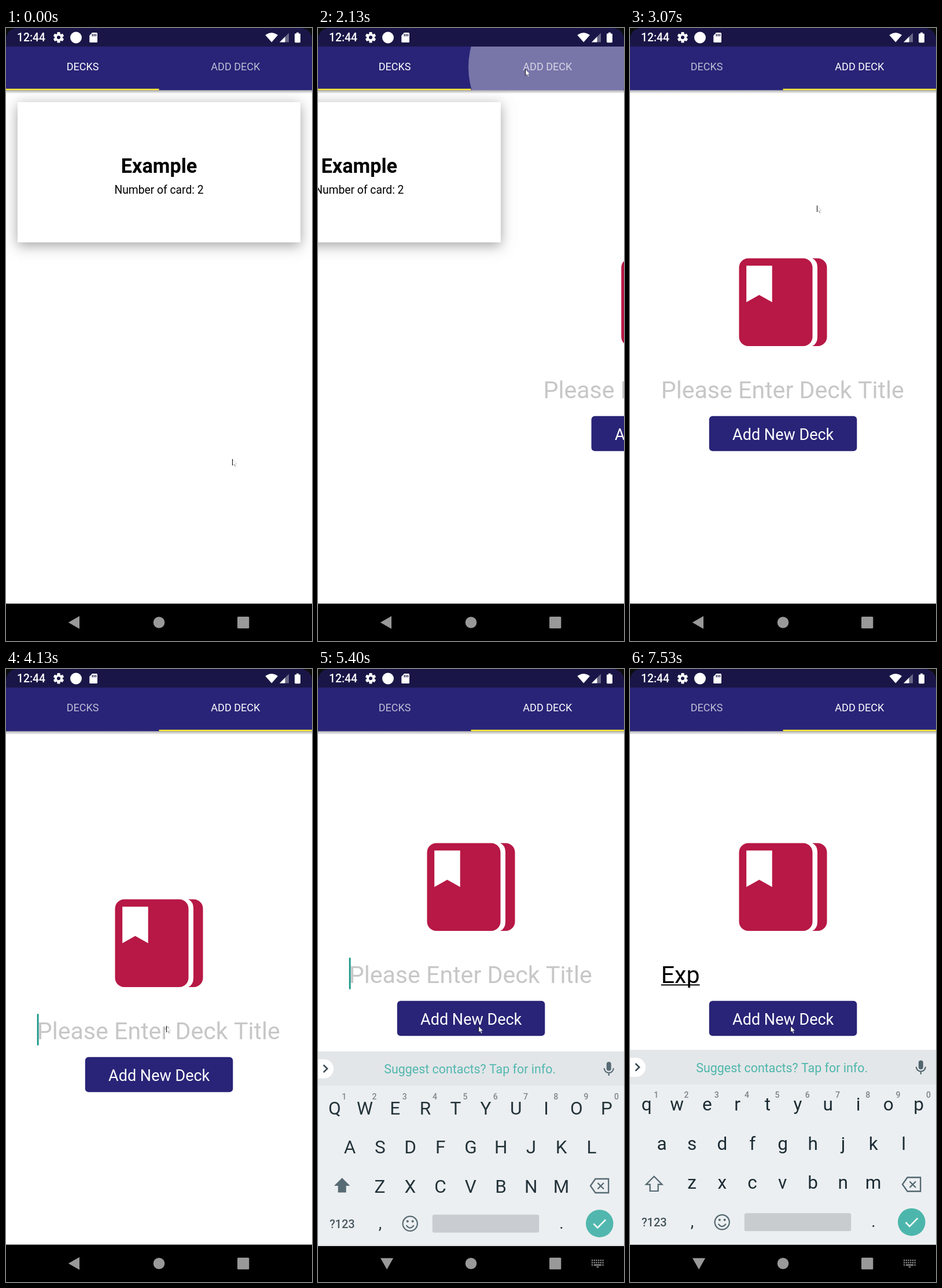
Recreate the animation shown at these times as an HTML page with a canvas. Size 529 px wide and 1058 px high, loop 8 s.

```html
<!DOCTYPE html>
<html lang="en">
<head>
<meta charset="utf-8">
<title>Flashcard decks</title>
<style>
html, body { margin: 0; width: 100%; height: 100%; overflow: hidden; background: #fff; }
canvas { display: block; width: 529px; height: 1058px; }
</style>
</head>
<body>
<canvas id="stage" width="529" height="1058"></canvas>
<script>
const W = 529, H = 1058, LOOP = 8000, FPS = 15;
const NAVY = '#292477', RED = '#b71845', TEAL = '#4db6ac', SLATE = '#52666f', NAV = '#999';
const HEAD = 107.4, KEYS_END = 993.5, FIELD_X = 53.7, SCROLL = 97;
const c = document.getElementById('stage').getContext('2d');

const clamp = v => Math.max(0, Math.min(1, v));
const lerp = (a, b, k) => a + (b - a) * k;
const within = (n, spans) => spans.some(([a, b]) => n >= a && n < b);

function rect(x, y, w, h, fill) {
  c.fillStyle = fill;
  c.fillRect(x, y, w, h);
}
function round(x, y, w, h, r, fill) {
  c.fillStyle = fill;
  c.beginPath();
  c.roundRect(x, y, w, h, r);
  c.fill();
}
function disc(x, y, r, fill) {
  c.fillStyle = fill;
  c.beginPath();
  c.arc(x, y, r, 0, Math.PI * 2);
  c.fill();
}
function shape(d, fill) {
  c.fillStyle = fill;
  c.fill(new Path2D(d));
}
function line(d, color, width) {
  c.strokeStyle = color;
  c.lineWidth = width;
  c.stroke(new Path2D(d));
}
function text(str, x, y, size, color, align = 'center', weight = 400) {
  c.font = `${weight} ${size}px Roboto, sans-serif`;
  c.textAlign = align;
  c.fillStyle = color;
  c.fillText(str, x, y);
}
function at(x, y, draw) {
  c.save();
  c.translate(x, y);
  draw();
  c.restore();
}

// Page slide; the tab indicator follows two ticks later.
function slide(n) {
  const u = clamp((n * 1000 / FPS - 2115) / 211);
  return 1 - Math.pow(1 - u, 5);
}

// tick, x, y
const PATH = [
  [0, 391, 744], [3, 389, 650], [6, 376, 400], [8, 362, 210], [10, 352, 121],
  [13, 336, 233], [16, 367, 130], [19, 358, 71]
];
function pointer(n) {
  if (n >= 41) {
    const k = clamp((n - 41) / 11), e = k * k * (3 - 2 * k);
    return [lerp(358, 277, e), lerp(71, 616, e)];
  }
  const i = PATH.findIndex(p => p[0] > n);
  if (i < 0) return [358, 71];
  const a = PATH[i - 1], b = PATH[i], k = (n - a[0]) / (b[0] - a[0]);
  return [lerp(a[1], b[1], k), lerp(a[2], b[2], k)];
}

function drawPointer(n) {
  const [x, y] = pointer(n);
  at(x, y, () => {
    const arrow = 'M.5 .5V11L3 8.8L5 13L6.6 12.3L4.8 8.3H8Z';
    shape(arrow, '#fff');
    line(arrow, 'rgba(0,0,0,.22)', .8);
    line('M.5 0V11', '#111', 1.1);
    line('M3.6 9.2L5 12.4', 'rgba(0,0,0,.5)', .8);
  });
}

function drawDecks() {
  c.save();
  c.shadowColor = 'rgba(0,0,0,.14)';
  c.shadowBlur = 20;
  rect(20, 128, 489, 242, '#fff');
  c.shadowColor = 'rgba(0,0,0,.24)';
  c.shadowBlur = 20;
  c.shadowOffsetY = 8;
  rect(20, 128, 489, 242, '#fff');
  c.restore();
  text('Example', 264.5, 249.5, 34.2, '#000', 'center', 700);
  text('Number of card: 2', 264.5, 286.3, 19.3, '#000');
}

function drawBook() {
  round(188.5, 397.5, 127, 151.5, 16, RED);
  shape('M315 397.5H324.5A16 16 0 0 1 340.5 413.5V533A16 16 0 0 1 324.5 549H315' +
        'Q324 545 324 533V413.5Q324 401.5 315 397.5Z', RED);
  shape('M201.2 410.2H245.7V473.2L223.4 460.8L201.2 473.2Z', '#fff');
}

function drawForm(n) {
  const typed = 'Exp'.slice(0, n >= 104 ? 3 : n >= 100 ? 2 : n >= 88 ? 1 : 0);
  drawBook();
  text(typed || 'Please Enter Deck Title', FIELD_X, 639, 41.14, typed ? '#000' : '#c7c7c7', 'left');
  const end = typed ? c.measureText(typed).width : 0;
  rect(FIELD_X, 641.3, end, 2, '#000');
  if (within(n, [[62, 68], [75, 83], [88, 96], [100, 113]])) {
    rect(FIELD_X + end, 595.3, 2.8, 54.3, '#159688');
  }
  round(136.8, 669.8, 255.5, 60.4, 6, NAVY);
  text('Add New Deck', 264.7, 711.3, 27, '#fff');
}

function drawRipple(n) {
  if (n < 27 || n > 33) return;
  const age = (n - 27) * 1000 / FPS + 30;
  const e = 1 - Math.pow(1 - clamp(age / 225), 2);
  const alpha = .37 * clamp(age / 75) * (n === 33 ? .4 : 1);
  c.save();
  c.beginPath();
  c.rect(0, 32, W, HEAD - 32);
  c.clip();
  disc(lerp(358, 397, e), lerp(72, 67.5, e), lerp(60, 137, e), `rgba(255,255,255,${alpha})`);
  c.restore();
}

function drawHeader(n) {
  const pos = slide(n - 2);
  const shade = c.createLinearGradient(0, HEAD, 0, HEAD + 6);
  shade.addColorStop(0, 'rgba(0,0,0,.32)');
  shade.addColorStop(1, 'rgba(0,0,0,0)');
  rect(0, HEAD, W, 6, shade);
  rect(0, 32, W, HEAD - 32, NAVY);
  drawRipple(n);
  text('DECKS', 132.5, 73, 18, `rgba(255,255,255,${1 - .3 * pos})`);
  text('ADD DECK', 396.8, 73, 18, `rgba(255,255,255,${.7 + .3 * pos})`);
  rect(264.5 * pos, HEAD - 2.6, 264.5, 2.6, '#ffeb3b');
}

function drawStatus() {
  rect(0, 0, W, 32, '#191647');
  text('12:44', 19, 23.4, 19.3, '#fff', 'left', 500);
  at(91, 16.3, () => {
    for (let i = 0; i < 6; i++) {
      c.rotate(Math.PI / 3);
      round(-2.6, -9.2, 5.2, 6, 1, '#fff');
    }
    disc(0, 0, 6.8, '#fff');
    disc(0, 0, 3, '#191647');
  });
  disc(121, 16.5, 10, '#fff');
  shape('M149 8H156.5Q158 8 158 9.5V23.5Q158 25 156.5 25H145.8Q144.3 25 144.3 23.5V13Z', '#fff');
  for (const x of [148.6, 151.6, 154.6]) rect(x, 10.3, 1.5, 4, '#191647');
  shape('M448.3 12.3Q459.2 4.2 470 12.3L459.2 24.5Z', '#fff');
  shape('M489 8.5V24.5H473Z', 'rgba(255,255,255,.35)');
  shape('M482.5 15V24.5H473Z', '#fff');
  round(499, 9.5, 10, 15.7, 1.4, '#fff');
  rect(502, 7.7, 4, 2, '#fff');
}

function drawRow(keys, x, y, upper) {
  [...keys].forEach((k, i) => {
    const cx = x + i * 52.25;
    if (upper) text(k, cx, y + 4.2, 31.5, '#1c2c34');
    else text(k.toLowerCase(), cx, y, 31.5, '#1c2c34');
  });
}

function drawKeyboard(n) {
  if (n < 80) return;
  const off = n > 82 ? 0 : 40 * Math.pow(2, -4 * (n - 80));
  const upper = n < 88;
  c.save();
  c.globalAlpha = 1 - off / 80;
  c.translate(0, off);
  rect(0, 657.5, W, KEYS_END - 657.5, '#eceff1');
  rect(0, 657.5, W, 59.3, '#e4e7e9');

  round(-20, 671, 47, 33, 16.5, '#fff');
  line('M9.5 681L16 687.3L9.5 693.6', '#37474f', 2.6);
  text('Suggest contacts? Tap for info.', 262.7, 695.5, 21.4, TEAL);
  round(498.8, 675.5, 8, 15.5, 4, SLATE);
  line('M494.8 686.5A8 8 0 0 0 510.8 686.5M502.8 694.5V699.5', SLATE, 2.2);

  [...'1234567890'].forEach((d, i) => text(d, 45.2 + i * 52.3, 740.3, 14, '#7b8286', 'center', 500));
  drawRow('QWERTYUIOP', 28.8, 761.8, upper);
  drawRow('ASDFGHJKL', 55, 829.6, upper);
  drawRow('ZXCVBNM', 107, 897, upper);

  const shift = 'M41.6 875.8L55.4 889.6H48.6V901H34.6V889.6H27.8Z';
  if (upper) shape(shift, SLATE);
  else line(shift, SLATE, 2.2);
  line('M479.5 877.5H502.2V901.5H479.5L471 889.5ZM483.5 884.5L494 895M494 884.5L483.5 895', SLATE, 2.3);

  text('?123', 41.8, 962, 20, '#44545c', 'center', 500);
  text(',', 107.5, 963, 28, '#1c2c34');
  text('.', 421, 963, 28, '#1c2c34');
  line('M171.8 954.8A12.6 12.6 0 1 1 146.6 954.8A12.6 12.6 0 1 1 171.8 954.8Z' +
       'M152.6 957.6Q159.2 966.5 165.8 957.6', SLATE, 2.2);
  disc(154.8, 950.8, 2, SLATE);
  disc(163.6, 950.8, 2, SLATE);
  round(197.8, 939.3, 184.4, 31, 3, '#c9cccf');
  disc(486.8, 954.6, 23.8, TEAL);
  line('M476.5 955L483.3 961.8L497.3 947.8', '#fff', 2.6);
  c.restore();
}

function drawNav(n) {
  if (n < 71) {
    shape('M107.8 1026L127 1015V1037Z', NAV);
  } else {
    shape('M108 1016.8H130.2L119.1 1036.2Z', NAV);
    for (let i = 0; i < 6; i++) {
      for (const y of [1019.5, 1023.5, 1027.5]) {
        if (y < 1027 || i === 0 || i === 5) rect(473 + i * 3.7, y, 2.2, 2.2, NAV);
      }
    }
    rect(476.8, 1027.5, 13.2, 2.2, NAV);
    shape('M480.5 1031.2H486.5L483.5 1033.5Z', NAV);
  }
  disc(264.5, 1026, 9.8, NAV);
  round(400, 1016, 20.3, 20.3, 1.5, NAV);
}

function drawCorners() {
  shape('M0 0H22Q0 0 0 22Z', '#0c0c0c');
  shape('M529 0H507Q529 0 529 22Z', '#0c0c0c');
}

function draw(n) {
  const pos = slide(n);
  rect(0, 0, W, H, '#fff');
  if (pos < 1) at(-W * pos, 0, drawDecks);
  if (pos > 0) at(W * (1 - pos), n >= 74 ? -SCROLL : 0, () => drawForm(n));
  drawHeader(n);
  drawStatus();
  rect(0, KEYS_END, W, H - KEYS_END, '#000');
  drawKeyboard(n);
  drawNav(n);
  drawPointer(n);
  drawCorners();
}

const start = performance.now();
function tick(now) {
  const t = Math.max(0, now - start) % LOOP;
  draw(Math.floor((t + 4) * FPS / 1000) % (LOOP * FPS / 1000));
  requestAnimationFrame(tick);
}
draw(0);
requestAnimationFrame(tick);
</script>
</body>
</html>
```
